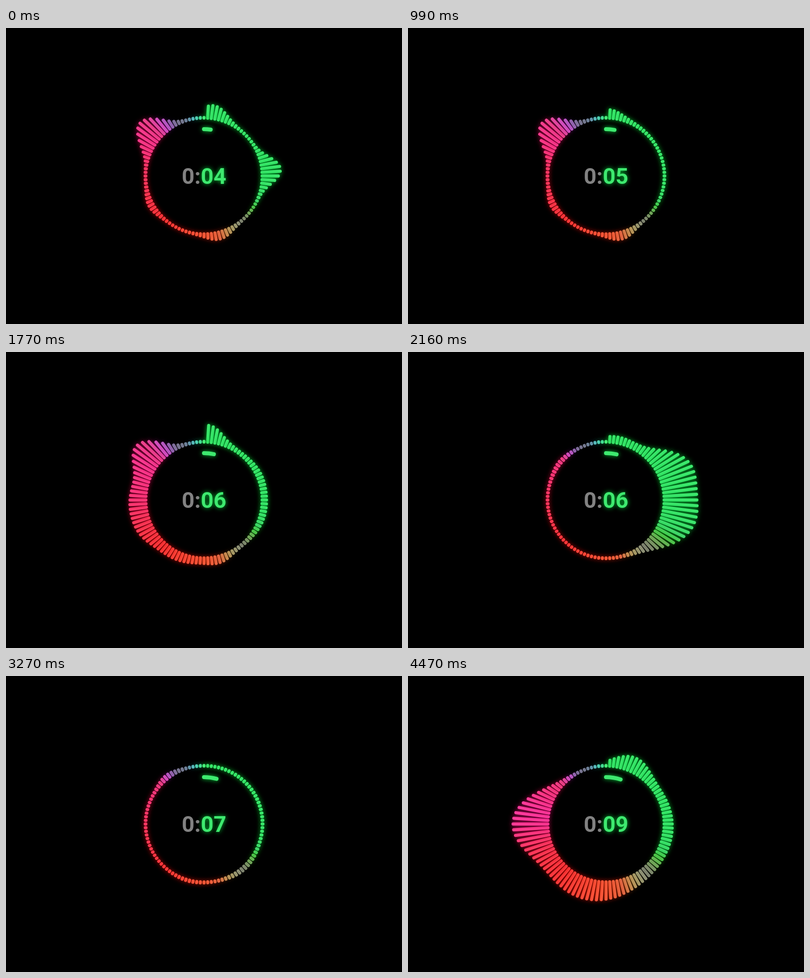
Write an HTML page with a canvas that moves like this. It is 800 px wide and 600 px high and loops after 4.5 s.

```html
<!DOCTYPE html>
<html lang="en">
<head>
<meta charset="utf-8">
<title>Circular audio visualizer</title>
<style>
  html, body { margin: 0; width: 100%; height: 100%; overflow: hidden; background: #000; }
  canvas { display: block; }
</style>
</head>
<body>
<canvas id="stage" width="800" height="600"></canvas>
<script>
const ctx = document.getElementById('stage').getContext('2d');
const LOOP = 4500, BARS = 100, RADIUS = 117.5, TAU = Math.PI * 2;
const FADE = 500, BEAT = 300;

const clamp = v => Math.max(0, Math.min(1, v));
const mix = (a, b, k) => a + (b - a) * clamp(k);
const bell = (v, center, spread) => Math.exp(-(((v - center) / spread) ** 2) / 2);

// A tone swells into its span of time and fades out of it
const tone = (bar, spread, height, from, to = from) => (i, t) => {
  const away = clamp(Math.max(from - t, t - to) / FADE);
  return height * bell(i, bar, spread) * Math.cos(away * TAU / 4) ** 2;
};

// A beat strikes fast and dies down at each of its start times
const beat = (bar, spread, height, starts) => (i, t) => {
  const level = starts.reduce((sum, start) => {
    const u = clamp((t - start) / BEAT);
    return sum + 6.75 * u * (1 - u) ** 2;
  }, 0);
  return height * bell(i, bar, spread) * level;
};

const sweeps = [150, 1540, 2560, 4080];
const sounds = [
  tone(86, 3.1, 49, 0, 1750), tone(46, 2.8, 13, 0, 1600), tone(67, 2.7, 8, 0, 1600),
  tone(2.2, 3, 25, 0), tone(23.6, 2.7, 36, 0),
  tone(0, 2.6, 49, 1380), tone(6, 5, 18, 1380),
  tone(3, 5, 11, 2160), tone(18, 4.2, 53, 2160), tone(28.8, 5.8, 64, 2160),
  tone(38.3, 4, 41, 2880), tone(54.5, 3.4, 14, 2880), tone(89.5, 2.7, 54, 2880),
  tone(15, 6.5, 16, 3690),
  tone(6.5, 4, 25, 4470), tone(27, 11, 15, 4470), tone(56, 10, 38, 4470), tone(75.5, 5.4, 63, 4470),
  beat(1, 3, 60, [30, 740, 1080, 1560, 2580, 3300, 3820, 4170]),
  beat(24, 5, 50, [30, 570, 3360]),
  beat(74, 7, 112, sweeps), beat(57, 6, 45, sweeps)
];

const barHeight = (i, t) => sounds.reduce((sum, sound) => sum + sound(i, t), 1.2);

// Green on the right, red to pink on the left, greyed where the two halves meet
function setColor(deg, height = 0) {
  const grey = Math.max(bell(deg, 142, 15), bell(deg, 337, 13));
  const green = deg < 142;
  let hue = green || deg < 165 ? mix(137, 14, (deg - 115) / 50) : 14 - 0.25 * (deg - 165);
  hue = mix(hue, -223, (deg - 315) / 45);
  hue -= 0.25 * height * bell(deg, 280, 20);
  const sat = (green ? 80 : 100) * (1 - 0.9 * grey);
  const light = (green ? 58 : 62) - 11 * grey;
  ctx.fillStyle = ctx.strokeStyle = `hsl(${hue}, ${sat}%, ${light}%)`;
  ctx.shadowColor = `hsla(${hue}, 100%, 38%, ${1 - grey})`;
}

function drawBars(t) {
  ctx.lineWidth = 6.3;
  for (let i = 1; i <= BARS; i++) {
    const a = i / BARS * TAU, x = Math.sin(a), y = -Math.cos(a);
    const height = barHeight(i, t), tip = RADIUS + height;
    setColor(i / BARS * 360, height);
    ctx.beginPath();
    ctx.moveTo(400 + x * RADIUS, 300 + y * RADIUS);
    ctx.lineTo(400 + x * tip, 300 + y * tip);
    ctx.stroke();
  }
}

function drawClock(seconds) {
  setColor(90);
  ctx.lineWidth = 8;
  ctx.beginPath();
  ctx.arc(400, 300, 95, -TAU / 4, -TAU / 4 + seconds / 180 * TAU);
  ctx.stroke();

  ctx.font = 'bold 45px Roboto, sans-serif';
  ctx.fillText(String(Math.floor(seconds)).padStart(2, '0'), 393.5, 316);
  ctx.shadowColor = 'transparent';
  ctx.fillStyle = '#828282';
  ctx.textAlign = 'right';
  ctx.fillText('0:', 393.5, 316);
  ctx.textAlign = 'left';
}

function frame(now) {
  const t = now % LOOP;
  ctx.clearRect(0, 0, 800, 600);
  ctx.lineCap = 'round';
  ctx.shadowBlur = 10;
  drawBars(t);
  drawClock(4.1 + t / 900);
  requestAnimationFrame(frame);
}
requestAnimationFrame(frame);
</script>
</body>
</html>
```
